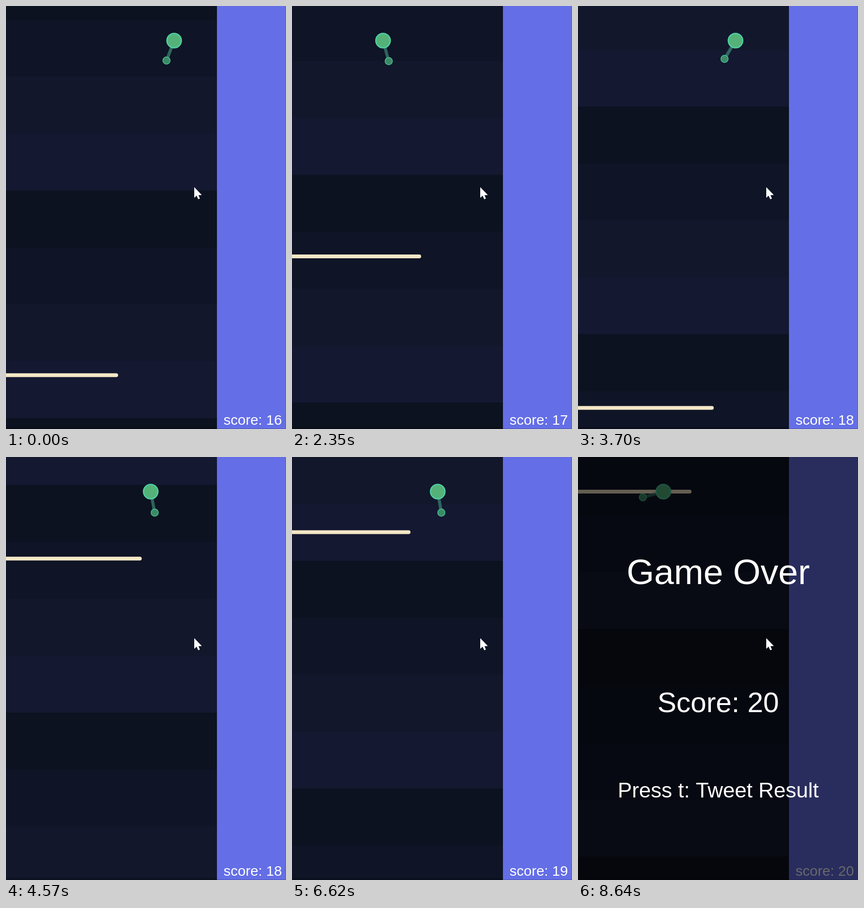
An HTML page with a canvas that plays this animation: 592 by 892 pixels, repeating every 9.3 s.

```html
<!DOCTYPE html>
<html lang="en">
<head>
<meta charset="utf-8">
<title>Dive game</title>
<style>
  html, body { margin: 0; width: 100%; height: 100%; overflow: hidden; background: #0c1220; }
  canvas { display: block; }
</style>
</head>
<body>
<canvas id="stage" width="592" height="892"></canvas>
<script>
const W = 592, H = 892, FIELD = 446, LOOP = 9300, END = 8640;
const PLAYER_Y = 73, ARM = 45, SPEED = 0.8;
const BANDS = ['#0c1220', '#0f1426', '#12172b', '#141831'];
const ctx = document.getElementById('stage').getContext('2d');

// Waypoints of the dive: time, x, depth, heading in degrees from straight down.
const PATH = [
  [0, 355.5, 0, -21],
  [1150, 282.5, 684, 21],
  [2350, 192.5, 1473, 15.5],
  [3700, 333, 2577, -31],
  [4750, 330, 3351, 8],
  [5640, 246.5, 3813, -17],
  [6720, 320, 4575, 6],
  [7720, 299, 5230, 19.5],
  [END, 180.5, 5786, -74.5]
];

// Obstacles: depth and right end.
const BARS = [[778.5, 237], [2001, 273], [3424.5, 287], [4648.5, 250.5], [5859, 240]];

const mod = (a, n) => ((a % n) + n) % n;

// The picture advances in steps of 50 ms, every fifth one 30 ms.
function snap(t) {
  if (t < 50) return 0;
  if (t >= END) return END;
  const origin = t < 6850 ? 50 : 6850;
  const start = origin + 970 * Math.floor((t - origin) / 970);
  const offset = i => 50 * i - 20 * Math.floor((i + 3) / 5);
  let i = 0;
  while (i < 20 && start + offset(i + 1) <= t) i++;
  return start + offset(i);
}

// Cubic through two values with given slopes; returns value and slope.
function hermite(a, b, ma, mb, s, span) {
  const p = ma * span, q = mb * span;
  const c2 = 3 * (b - a) - 2 * p - q, c3 = 2 * (a - b) + p + q;
  return [a + s * (p + s * (c2 + s * c3)), (p + s * (2 * c2 + 3 * s * c3)) / span];
}

function poseAt(t) {
  let i = 0;
  while (i < PATH.length - 2 && t >= PATH[i + 1][0]) i++;
  const [ta, xa, da, ha] = PATH[i], [tb, xb, db, hb] = PATH[i + 1];
  const span = tb - ta, s = (t - ta) / span;
  const vx = h => SPEED * Math.sin(h * Math.PI / 180);
  const vy = h => SPEED * Math.cos(h * Math.PI / 180);
  const [x, dx] = hermite(xa, xb, vx(ha), vx(hb), s, span);
  const [depth, dd] = hermite(da, db, vy(ha), vy(hb), s, span);
  return { x, depth, angle: Math.atan2(dx, dd) };
}

function rect(x, y, w, h, color) {
  ctx.fillStyle = color;
  ctx.fillRect(x, y, w, h);
}

function disc(x, y, r, fill, line, width) {
  ctx.beginPath();
  ctx.arc(x, y, r, 0, Math.PI * 2);
  ctx.fillStyle = fill;
  ctx.fill();
  ctx.strokeStyle = line;
  ctx.lineWidth = width;
  ctx.stroke();
}

function label(text, x, y, size, align) {
  ctx.font = size + 'px "Liberation Sans", Arial, sans-serif';
  ctx.textAlign = align;
  ctx.fillStyle = '#fff';
  ctx.fillText(text, x, y);
}

function drawField(depth) {
  let y = Math.round(mod(389 - depth, 480)) - 480;
  for (let i = 0; y < H; i++, y += 120) rect(0, y, FIELD, 120, BANDS[i % 4]);
  rect(0, 888, FIELD, 4, 'rgba(0,0,0,0.25)');
}

function drawBar(y, right) {
  ctx.strokeStyle = '#f5e8c6';
  ctx.lineWidth = 8;
  ctx.lineCap = 'round';
  ctx.beginPath();
  ctx.moveTo(-10, y);
  ctx.lineTo(right - 4, y);
  ctx.stroke();
}

function drawPlayer(x, angle) {
  const tipX = x + ARM * Math.sin(angle), tipY = PLAYER_Y + ARM * Math.cos(angle);
  ctx.strokeStyle = 'rgba(66,150,128,0.62)';
  ctx.lineWidth = 6.5;
  ctx.lineCap = 'butt';
  ctx.beginPath();
  ctx.moveTo(x, PLAYER_Y);
  ctx.lineTo(tipX, tipY);
  ctx.stroke();
  disc(tipX, tipY, 7.6, '#3b8a66', '#48b68c', 1.8);
  disc(x, PLAYER_Y, 15.3, '#54b279', '#4fd0a4', 2.6);
}

function drawPanel(score) {
  rect(FIELD, 0, W - FIELD, H, '#646ee6');
  rect(W - 1, 0, 1, H, '#565fc8');
  rect(FIELD, H - 1, W - FIELD, 1, '#4a52ae');
  label('score: ' + score, 460, 883, 30, 'left');
}

function drawGameOver(score) {
  rect(0, 0, W, H, 'rgba(0,0,0,0.59)');
  label('Game Over', 296.5, 268, 75, 'center');
  label('Score: ' + score, 296.5, 538, 60, 'center');
  label('Press t: Tweet Result', 296.5, 718, 45, 'center');
}

function drawCursor() {
  const points = [[0, 0], [0, 22.5], [5, 18], [8.5, 25.5], [12, 24], [9, 17], [16, 16.5]];
  ctx.beginPath();
  for (const [x, y] of points) ctx.lineTo(398 + x, 382 + y);
  ctx.fillStyle = '#fff';
  ctx.fill();
}

function draw(t) {
  const { x, depth, angle } = poseAt(t);
  const ahead = BARS.filter(([d]) => d > depth);
  const score = 16 + BARS.length - ahead.length;
  drawField(depth);
  // Only the nearest obstacle can be on screen.
  if (ahead.length) drawBar(ahead[0][0] - depth, ahead[0][1]);
  drawPlayer(x, angle);
  drawPanel(score);
  if (t >= END) drawGameOver(score);
  drawCursor();
}

const began = performance.now();
function tick() {
  draw(snap((performance.now() - began) % LOOP));
  requestAnimationFrame(tick);
}
tick();
</script>
</body>
</html>
```
